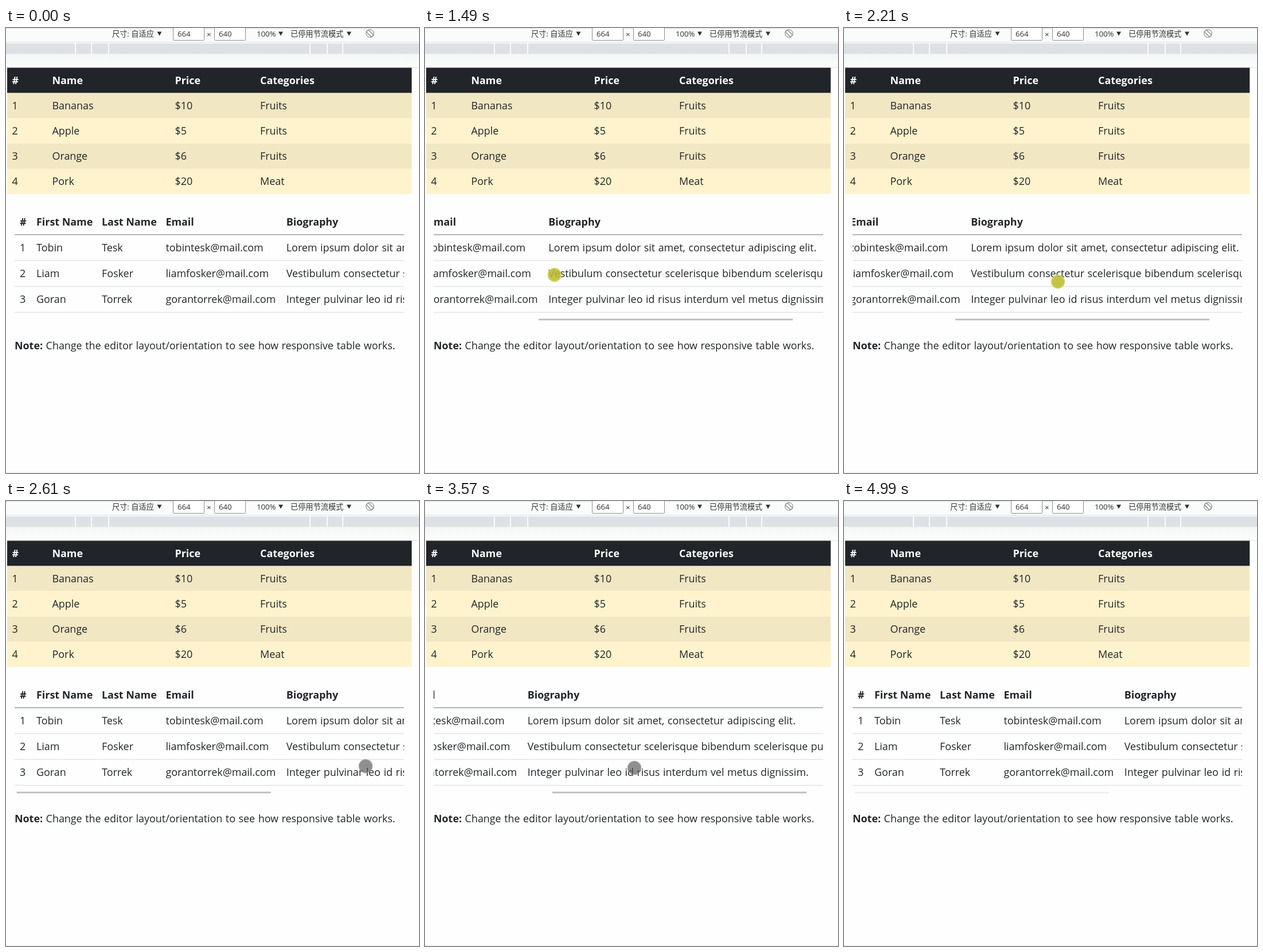
These frames come from a looping animation (720x777 px, 5.95 s). An HTML page:

```html
<!DOCTYPE html>
<html lang="zh-CN">
<head>
<meta charset="utf-8">
<style>
html, body { margin: 0; width: 100%; height: 100%; overflow: hidden; background: #fefefe; }
svg { display: block; }
text { font: 17.9px "Open Sans", "Noto Sans", "Noto Sans CJK SC", sans-serif; fill: #212529; white-space: pre; word-spacing: .9px; }
.b { font-weight: 700; word-spacing: 0; }
.w { fill: #fff; }
.bar { font-size: 13.2px; fill: #303134; word-spacing: 0; }
</style>
</head>
<body>
<svg id="stage" width="720" height="777" viewBox="0 0 720 777"></svg>
<script>
const LOOP = 5950, MAX_SCROLL = 348;
const text = (x, y, s, cls = '') => `<text x="${x}" y="${y}" class="${cls}">${s}</text>`;
const rect = (x, y, w, h, fill, more = '') =>
  `<rect x="${x}" y="${y}" width="${w}" height="${h}" fill="${fill}" ${more}/>`;
const rowText = (cols, row, y, cls) => row.map((s, i) => text(cols[i], y, s, cls)).join('');

function toolbar() {
  const arrow = x => `<path d="M${x - 4} 6.5h8l-4 7z" fill="#303134"/>`;
  const field = (x, s) => rect(x, -4, 54, 25.5, '#fff', 'stroke="#8a8d91" rx="1"') + text(x + 7.5, 14.5, s, 'bar');
  return rect(0, 0, 720, 25, '#fafbfb') + rect(0, 0, 720, 1, '#dcdde0') + rect(0, 24.5, 720, 1, '#d8dbdf') +
    text(185, 14.5, '尺寸: 自适应', 'bar') + arrow(267.5) +
    field(291.5, '664') + text(350, 15.5, '×', 'bar') + field(363.5, '640') +
    text(437, 14.5, '100%', 'bar') + arrow(479) +
    text(496, 14.5, '已停用节流模式', 'bar') + arrow(598) +
    `<g fill="none" stroke="#6e7175" transform="translate(634.5 9.5)">
      <rect x="-2.5" y="-6.5" width="5" height="13" rx="1" transform="rotate(-45)"/><circle r="6.8"/></g>` +
    rect(0, 27, 720, 18.5, '#dde1e6') +
    [121, 149, 179, 530, 560, 587].map(x => rect(x - 1, 27, 2, 18.5, '#fafbfb')).join('') +
    rect(0, 45.5, 720, 23.5, 'url(#shade)') + rect(0, 68.5, 720, 1, '#e2e4e6');
}

function goods() {
  const cols = [10.5, 80.5, 294.5, 443], pitch = 44.1;
  const rows = [['#', 'Name', 'Price', 'Categories'], [1, 'Bananas', '$10', 'Fruits'],
    [2, 'Apple', '$5', 'Fruits'], [3, 'Orange', '$6', 'Fruits'], [4, 'Pork', '$20', 'Meat']];
  return rows.map((row, i) => {
    const y = 69.4 + pitch * i;
    const fill = !i ? '#212529' : i % 2 ? '#f2e7c3' : '#fff3cd';
    return rect(2, y, 705.3, pitch, fill) + rowText(cols, row, y + 28.1, i ? '' : 'b w');
  }).join('');
}

function people() {
  const cols = [24, 53, 167, 278.4, 488.8], pitch = 45.2;
  const rows = [['#', 'First Name', 'Last Name', 'Email', 'Biography'],
    [1, 'Tobin', 'Tesk', 'tobintesk@mail.com', 'Lorem ipsum dolor sit amet, consectetur adipiscing elit.'],
    [2, 'Liam', 'Fosker', 'liamfosker@mail.com', 'Vestibulum consectetur scelerisque bibendum scelerisque purus.'],
    [3, 'Goran', 'Torrek', 'gorantorrek@mail.com', 'Integer pulvinar leo id risus interdum vel metus dignissim.']];
  return rows.map((_, i) => rect(15, 360.3 + pitch * i, 679, 1.2, i ? '#dcdee0' : '#85878a')).join('') +
    '<g clip-path="url(#view)"><g id="rows">' +
    rows.map((row, i) => rowText(cols, row, 344.8 + pitch * i, i ? '' : 'b')).join('') + '</g></g>';
}

stage.innerHTML = `<defs>
  <clipPath id="view"><rect x="15" y="320" width="679" height="180"/></clipPath>
  <linearGradient id="shade" x2="0" y2="1"><stop stop-color="#f4f6f6"/><stop offset="1" stop-color="#fdfdfd"/></linearGradient>
  </defs>` + rect(0, 0, 720, 777, '#fefefe') + toolbar() + goods() + people() +
  rect(0, 507.6, 443, 2.8, '#bcbcbc', 'id="thumb"') +
  text(15, 560.5, '<tspan class="b">Note:</tspan> Change the editor layout/orientation to see how responsive table works.') +
  rect(0, 775.5, 720, 1, '#e9eaeb') +
  '<circle id="dot" r="11.4" stroke-width="1.8"/>';

// Each pointer move eases to its end point; a swipe also scrolls the table, coasting after release.
const enter = { x: 658, y: 763 };
const moves = [
  { from: 350, to: 930, x: 400, y: 434 },
  { from: 1000, to: 1530, x: 223, y: 431, scroll: [1000, 1700] },
  { from: 1930, to: 2610, x: 627, y: 463, scroll: [2030, 2610] },
  { from: 3050, to: 3560, x: 365, y: 466, scroll: [3072, 3700] },
  { from: 3890, to: 4450, x: 650, y: 465, scroll: [3940, 4476] },
  { from: 4450, to: 4620, x: 735, y: 632 }
];
const progress = (t, from, to) => Math.min(1, Math.max(0, (t - from) / (to - from)));
const ease = k => k * k * (3 - 2 * k);

function pose(t) {
  let { x, y } = enter, scroll = 0, down = false;
  for (const m of moves) {
    const k = ease(progress(t, m.from, m.to)), dx = m.x - x;
    x += dx * k;
    y += (m.y - y) * k;
    if (!m.scroll) continue;
    const s = progress(t, ...m.scroll);
    scroll -= Math.sign(m.scroll && k ? dx : 0) * MAX_SCROLL * ease(s);
    down ||= s > 0 && s < .75;
    if (k < 1 && s < 1) break;
  }
  return { x, y, scroll, down };
}

function draw() {
  const t = performance.now() % LOOP;
  const { x, y, scroll, down } = pose(t);
  rows.setAttribute('transform', `translate(${-scroll} 0)`);
  thumb.setAttribute('x', 18.7 + scroll * .656);
  thumb.setAttribute('opacity', t < 1000 ? 0 : 1 - .74 * progress(t, 4830, 4990));
  dot.setAttribute('cx', x);
  dot.setAttribute('cy', y);
  dot.setAttribute('fill', down ? 'rgba(188,188,45,.88)' : 'rgba(85,85,85,.66)');
  dot.setAttribute('stroke', down ? 'rgba(212,212,105,.9)' : 'rgba(150,150,150,.75)');
  dot.setAttribute('visibility', t >= 350 && t < 4620 ? 'visible' : 'hidden');
  requestAnimationFrame(draw);
}
draw();
</script>
</body>
</html>
```
